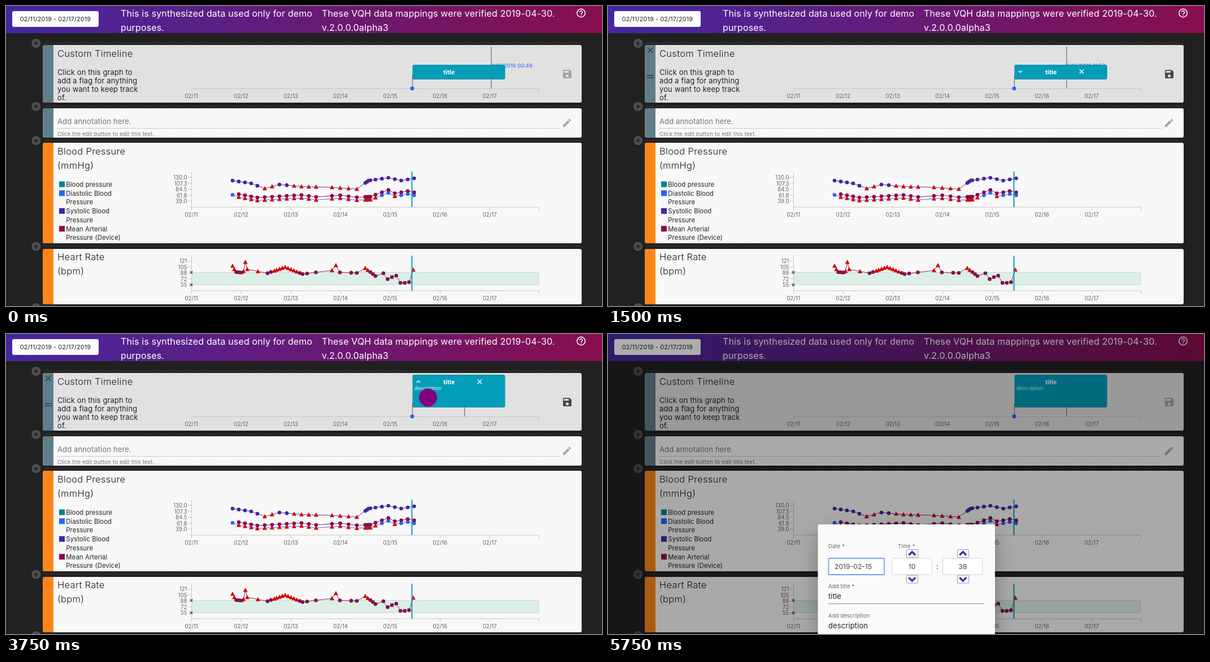
Recreate the animation shown at these times as an HTML page. Size 1055 px wide and 531 px high, loop 6000 ms.

```html
<!DOCTYPE html>
<html lang="en">
<head>
<meta charset="utf-8">
<title>Patient timeline</title>
<style>
html, body { margin: 0; width: 100%; height: 100%; overflow: hidden; background: #212121; }
svg { display: block; width: 100vw; height: 100vh; font-family: Inter, "Open Sans", sans-serif; }
.head { font-size: 16px; letter-spacing: .15px; fill: #fff; }
.title { font-size: 16.5px; font-weight: 300; letter-spacing: .3px; fill: #1c1c1c; }
.body { font-size: 13px; letter-spacing: .12px; fill: #222; }
.note { font-size: 9.6px; letter-spacing: .2px; fill: #777; }
.key { font-size: 11.3px; letter-spacing: .1px; fill: #222; }
.axis { font-size: 9.7px; fill: #666; }
.date { font-size: 11px; letter-spacing: .07px; fill: #222; }
.stamp { font-size: 9.5px; fill: #2962ff; }
.flag { font-size: 11px; font-weight: 700; fill: #fff; }
.desc { font-size: 9px; fill: #e6f6f9; }
.label { font-size: 9.5px; letter-spacing: .15px; fill: #666; }
.field { font-size: 12.2px; fill: #444; }
.mid { text-anchor: middle; }
.end { text-anchor: end; }
.sheet { filter: drop-shadow(0 14px 17px rgba(0, 0, 0, .28)); }
</style>
</head>
<body>
<svg id="stage" viewBox="0 0 1055 531" preserveAspectRatio="none"></svg>
<script>
const LOOP = 6000;
const INDIGO = '#4527a0', MAROON = '#880e4f', BLUE = '#2962ff', RED = '#d50000', TEAL = '#029db9';
const SLATE = '#607d8b', ORANGE = '#ff8419';
const DAY = 88, AXIS_X = 328, LAST_DAY = 856;
const FAINT = .34;

const SAVE = 'M17 3H5a2 2 0 0 0-2 2v14a2 2 0 0 0 2 2h14a2 2 0 0 0 2-2V7l-4-4zm-5 16a3 3 0 1 1 0-6 3 3 0 0 1 0 6zm3-10H5V5h10v4z';
const PENCIL = 'M3 17.25V21h3.75L17.8 9.94l-3.75-3.75L3 17.25zM20.7 7.04a1 1 0 0 0 0-1.41l-2.34-2.34a1 1 0 0 0-1.41 0l-1.83 1.83 3.75 3.75 1.83-1.83z';

const rect = (x, y, w, h, fill, more = '') =>
  `<rect x="${x}" y="${y}" width="${w}" height="${h}" fill="${fill}" ${more}/>`;
const text = (x, y, cls, s, more = '') => `<text x="${x}" y="${y}" class="${cls}" ${more}>${s}</text>`;
const line = (d, stroke, width = 1, more = '') =>
  `<path d="${d}" fill="none" stroke="${stroke}" stroke-width="${width}" ${more}/>`;
const circle = (x, y, r, fill, more = '') => `<circle cx="${x}" cy="${y}" r="${r}" fill="${fill}" ${more}/>`;
const group = (id, inner) => `<g id="${id}">${inner}</g>`;
const icon = (d, x, y, size, fill, id = '') =>
  `<path id="${id}" d="${d}" fill="${fill}" transform="translate(${x} ${y}) scale(${size / 18}) translate(-12 -12)"/>`;
const cross = (x, y, r, stroke, width = 1.4) =>
  line(`M${x - r} ${y - r}l${2 * r} ${2 * r}m0 ${-2 * r}l${-2 * r} ${2 * r}`, stroke, width);
// A positive h points up, a negative one down.
const chevron = (x, y, w, h, stroke, width) => line(`M${x - w} ${y + h}L${x} ${y - h}L${x + w} ${y + h}`, stroke, width);

function header() {
  return rect(0, 0, 1055, 48, 'url(#bar)') +
    rect(11, 9, 153, 28, '#fff', 'rx="3"') +
    text(87.5, 27, 'date mid', '02/11/2019 - 02/17/2019') +
    text(203, 18.5, 'head', 'This is synthesized data used only for demo') +
    text(203, 43.5, 'head', 'purposes.') +
    text(559, 18.5, 'head', 'These VQH data mappings were verified 2019-04-30.') +
    text(559, 43.5, 'head', 'v.2.0.0.0alpha3') +
    circle(1018, 12.5, 7.2, 'none', 'stroke="#fff" stroke-width="1.5"') +
    line('M1015.6 11a2.4 2.4 0 1 1 3.8 1.9q-1.4.9-1.4 2', '#fff', 1.4) +
    rect(1017.3, 15.9, 1.4, 1.4, '#fff');
}

function adder(y, i) {
  return `<g id="add${i}" opacity="${FAINT}">` +
    line(`M69 ${y - .5}H1017`, '#b0b0b0', 1, 'stroke-dasharray="2 2"') +
    circle(53.3, y, 8, '#a8a8a8') +
    line(`M49 ${y}h8.6m-4.3 -4.3v8.6`, '#161616', 1.7) + '</g>';
}

const card = (y, h, fill, stripe) =>
  rect(65.5, y, 953.5, h, fill, 'rx="3"') +
  `<path d="M84 ${y}H68.5a3 3 0 0 0-3 3v${h - 6}a3 3 0 0 0 3 3H84z" fill="${stripe}"/>`;

function timeAxis(y, labelY) {
  let out = line(`M${AXIS_X} ${y}H943.5`, '#c6c6c6');
  for (let i = 0; i <= 7; i++) {
    const x = Math.min(AXIS_X + i * DAY, 943) + .5;
    out += line(`M${x} ${y}v6`, '#c6c6c6');
    if (i < 7) out += text(x - .3, labelY, 'axis mid', '02/' + (11 + i));
  }
  return out;
}

function valueAxis(top, bottom, labels) {
  return line(`M${AXIS_X + .5} ${top}V${bottom}`, '#c6c6c6') + labels.map((s, i) => {
    const y = top + 10 + i * 10.5;
    return line(`M322 ${y}h6`, '#c6c6c6') + text(320.5, y + 3.6, 'axis end', s);
  }).join('');
}

// Evenly spaced readings from a to b.
const span = (a, b, n) => Array.from({ length: n }, (_, i) => a + (b - a) * i / (n - 1));

// A trend runs straight between a few turning points.
const trend = keys => x => {
  const i = Math.max(1, keys.findIndex(k => k[0] >= x));
  const [x0, y0] = keys[i - 1], [x1, y1] = keys[i];
  return y0 + (y1 - y0) * (x - x0) / (x1 - x0);
};

// Readings that are out of range become red triangles.
function series(xs, f, color, outOfRange) {
  return line('M' + xs.map(x => x + ' ' + f(x)).join('L'), color, .9) + xs.map(x => outOfRange(f(x))
    ? `<path d="M${x} ${f(x) - 4.2}l4 7.4h-8z" fill="${RED}"/>`
    : circle(x, f(x), 3.3, color)).join('');
}

const marker = (top, bottom) => line(`M718.5 ${top}V${bottom}`, '#0b9dc0', 2);

function timeline() {
  const lines = ['Click on this graph to', 'add a flag for anything', 'you want to keep track', 'of.'];
  return card(69, 102, '#e1e1e1', SLATE) +
    text(91, 90, 'title', 'Custom Timeline') +
    lines.map((s, i) => text(91, 121.5 + i * 15, 'body', s)).join('') +
    timeAxis(146.5, 162.5) +
    group('rowTools', cross(74.7, 78.5, 4.6, '#2c3940') + line('M68.5 123.3h12.6m-12.6 4h12.6', '#2c3940', 1.5)) +
    icon(SAVE, 993.5, 120.5, 15, '#a4a4a4', 'save') +
    line('M719.5 122V146', '#666') +
    circle(719, 146, 3.4, BLUE) +
    group('cursor', line('M.5 72V146', '#555') + text(.5, 108.5, 'stamp', '', 'id="stamp"')) +
    rect(720, 104, 163, 26, TEAL, 'id="flagBox" rx="2" stroke="#168ba2" stroke-width="1"') +
    text(784.3, 0, 'flag mid', 'title', 'id="flagTitle"') +
    group('closedTools', chevron(730, 116, 3.3, -1.6, '#fff', 1.4) + cross(838.3, 116, 3.7, '#fff')) +
    group('openTools', chevron(730, 84.3, 3.3, 1.6, '#fff', 1.4) + cross(838.3, 84.3, 3.7, '#fff') +
      icon(PENCIL, 746.3, 115, 10.5, '#fff')) +
    text(723, 99, 'desc', 'description', 'id="flagDesc"') +
    circle(0, 0, 16, '#800080', 'id="tap"');
}

function annotation() {
  return card(181, 52, '#f8f8f8', SLATE) +
    text(91, 209, 'body', 'Add annotation here.', 'style="fill:#757575"') +
    line('M91 216.5H980', '#999', 1, 'stroke-dasharray="1.5 1.5"') +
    text(91, 230, 'note', 'Click the edit button to edit this text.') +
    icon(PENCIL, 993, 207, 14.5, '#a8a8a8');
}

function legend() {
  const rows = [['Blood pressure', '#00838f'], ['Diastolic Blood', BLUE], ['Pressure'],
    ['Systolic Blood', INDIGO], ['Pressure'], ['Mean Arterial', MAROON], ['Pressure (Device)']];
  return rows.map(([s, color], i) => {
    const y = 310.5 + i * 15.75;
    return (color ? rect(94, y, 10, 10, color) : '') + text(106.3, y + 9.3, 'key', s);
  }).join('');
}

function pressure() {
  const xs = [...span(401, 434, 4), ...span(445, 549, 9), ...span(577, 621, 4),
    ...span(636, 645, 4), ...span(654, 722.5, 7)];
  const systolic = trend([[401, 309], [434, 314], [458, 323], [484, 316], [523, 319.5], [577, 321], [621, 324],
    [642, 309], [677, 304], [700, 309], [723, 305]]);
  const mean = trend([[401, 329], [412, 333], [445, 339], [523, 334.5], [549, 338], [592, 335], [621, 338.5], [645, 337.5],
    [677, 325.5], [689, 332], [711, 327.5], [723, 330]]);
  const diastolic = x => mean(x) + 5.2;
  return card(242, 178, '#f8f8f8', ORANGE) +
    text(91, 262.5, 'title', 'Blood Pressure') + text(91, 288, 'title', '(mmHg)') + legend() +
    valueAxis(293.5, 356, ['130.0', '107.3', '84.5', '61.8', '39.0']) +
    timeAxis(356, 372.5) +
    series(xs, diastolic, BLUE, y => y > 335.3) +
    series(xs.slice(1), mean, MAROON, () => false) +
    series(xs, systolic, INDIGO, y => y > 318.2) +
    marker(293, 356);
}

function heart() {
  const xs = [...span(401, 427, 9), 446, ...span(463, 475, 3), ...span(479, 525, 10), 533, 548.5,
    ...span(577, 591, 3), 611, 621, ...span(636, 654, 5), ...span(668, 721, 8)];
  const rate = trend([[401, 460], [407, 471], [420, 472], [424, 452], [427, 466], [463, 473], [494, 462], [525, 474.5],
    [577, 468], [584, 459], [591, 471.5], [621, 472.5], [636, 464], [654, 478], [668, 473], [676, 484], [690, 476],
    [698, 490], [713, 490], [721, 467]]);
  return card(430, 98, '#f8f8f8', ORANGE) +
    text(91, 449.8, 'title', 'Heart Rate') + text(91, 475, 'title', '(bpm)') +
    rect(328.5, 471.5, 614.5, 22, '#dcefe6', 'stroke="#c5ddd1" stroke-width="1"') +
    valueAxis(441.5, 504, ['121', '105', '88', '72', '55']) +
    timeAxis(504, 520.5) +
    cross(328, 471.5, 2.2, '#555', 1.6) + cross(328, 493.5, 2.2, '#555', 1.6) +
    series(xs, rate, MAROON, y => y < 470.5) +
    marker(442, 504);
}

function stepper(x, value) {
  const button = (y, h) => rect(x - 9.5, y - 7, 20, 14, '#fff', 'stroke="#999" stroke-width="1" rx="1"') +
    chevron(x + .3, y, 6, h, INDIGO, 3.2);
  return rect(x - 35.5, 397, 70.5, 29, '#fff', 'stroke="#d2d2d2" stroke-width="1" rx="2"') +
    text(x, 416, 'field mid', value) + button(388.5, 3) + button(434, -3);
}

function dialog() {
  return rect(0, 0, 1055, 531, '#000', 'opacity=".32"') +
    rect(371.5, 337, 313.5, 400, '#fafafa', 'rx="2" class="sheet"') +
    text(390, 378.5, 'label', 'Date *') + text(513, 378.5, 'label', 'Time *') +
    rect(390.5, 397, 98.5, 29, '#fff', 'stroke="#72a3f0" stroke-width="1.8" rx="1"') +
    text(401, 416, 'field', '2019-02-15') +
    rect(468, 403, 1, 16, '#222', 'id="caret"') +
    stepper(538, '10') + text(583, 416, 'body mid', ':') + stepper(628, '38') +
    text(390, 450.3, 'label', 'Add title *') + text(390, 469.3, 'body', 'title') +
    line('M390 477.5H666', '#8a8a8a') +
    text(390, 502, 'label', 'Add description') + text(390, 521.3, 'body', 'description');
}

const stage = document.getElementById('stage');
stage.innerHTML = `<defs>
  <linearGradient id="bar"><stop stop-color="${INDIGO}"/><stop offset="1" stop-color="${MAROON}"/></linearGradient>
  </defs>` + rect(0, 0, 1055, 531, '#212121') + header() +
  [66, 178, 238.3, 425.5, 534].map(adder).join('') +
  timeline() + annotation() + pressure() + heart() + group('dialog', dialog());

const $ = id => document.getElementById(id);
const show = (id, on) => $(id).setAttribute('visibility', on ? 'inherit' : 'hidden');
const set = (id, attrs) => { for (const k in attrs) $(id).setAttribute(k, attrs[k]); };
const within = (t, a, b) => t >= a && t < b;

// The screen refreshes four times a second while the pointer speeds up to the left.
function pointerX(t) {
  const step = Math.floor(t / 250);
  const u = Math.min(1, Math.max(0, (step - 1) / 5));
  return 859 - 47.2 * u ** 1.495;
}

function stampAt(x) {
  const time = new Date(Date.UTC(2019, 1, 17) + Math.round((x - LAST_DAY) / DAY * 1440) * 60000);
  return `2/${time.getUTCDate()}/2019 ${time.toISOString().slice(11, 16)}`;
}

function draw(t) {
  const x = pointerX(t);
  const open = t >= 2500, modal = t >= 4000;
  const rowHover = within(t, 1250, 4000);
  const firstTap = within(t, 2250, 2500), secondTap = within(t, 3750, 4000);

  set('cursor', { transform: `translate(${x - .5} 0)` });
  $('stamp').textContent = stampAt(x);
  set('add1', { opacity: within(t, 1000, 1250) ? .9 : FAINT });
  show('rowTools', rowHover);
  set('save', { fill: rowHover ? '#424a50' : '#a4a4a4' });

  set('flagBox', { y: open ? 72.5 : 104.5, height: open ? 57 : 25 });
  set('flagTitle', { y: open ? 88.7 : 120.5 });
  show('flagDesc', open);
  show('closedTools', within(t, 1500, 2500));
  show('openTools', open && !modal);

  show('tap', firstTap || secondTap);
  set('tap', firstTap ? { cx: 810, cy: 116, opacity: .86 } : { cx: 747, cy: 112.5, opacity: 1 });

  show('dialog', modal);
  show('caret', within(t, 4000, 4500) || within(t, 5000, 5750));
}

const start = performance.now();
function tick() {
  draw((performance.now() - start) % LOOP);
  requestAnimationFrame(tick);
}
tick();
</script>
</body>
</html>
```
